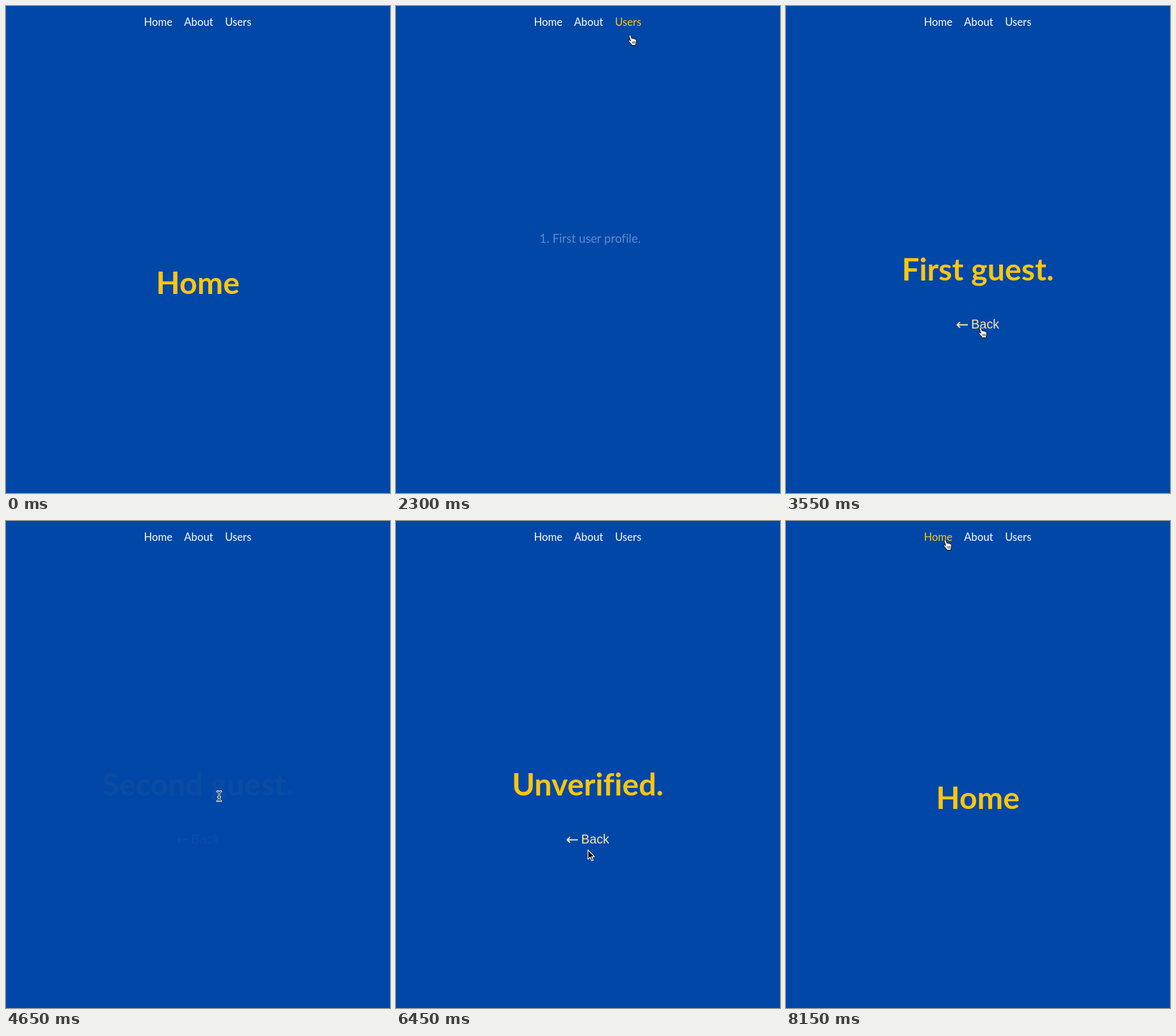
Recreate the animation shown at these times as an HTML page. Size 600 by 761 pixels, loop 8200 ms.

```html
<!DOCTYPE html>
<html lang="en">
<head>
<meta charset="utf-8">
<title>Page transitions</title>
<style>
  html, body { margin: 0; width: 100%; height: 100%; overflow: hidden; background: #0047a8; }
  svg { display: block; width: 600px; height: 761px; }
  text { font-family: Lato, "Open Sans", sans-serif; font-variant-ligatures: none; fill: #fff; text-anchor: middle; }
  .nav { font-size: 16.7px; }
  .title { font-size: 48.3px; font-weight: 700; fill: #fdc60f; }
  .item { font-size: 18.7px; text-anchor: start; }
  .number { font-size: 18.7px; text-anchor: end; }
  .back { font-family: "Liberation Sans", Arial, sans-serif; font-size: 19.7px; fill: #ffe4ac; }
  .pointing { font-family: "DejaVu Sans", sans-serif; font-size: 24px; fill: #ffe4ac; }
  .hot { fill: #fdc60f; }
</style>
</head>
<body>
<svg id="stage" viewBox="0 0 600 761">
  <defs><path id="bar" d="M-3-7.5Q0-7.5 0-5Q0-7.5 3-7.5M0-5V5M-3 7.5Q0 7.5 0 5Q0 7.5 3 7.5M-1.6 1.6H1.6"/></defs>
  <g id="cursor" stroke-linejoin="round" stroke-linecap="round">
    <path id="arrow" fill="#000" stroke="#fff" stroke-width="1.2"
      d="M0 0V14.5L3.4 11.4 5.8 17 8 16 5.7 10.6H10Z"/>
    <g id="hand" fill="#fff" stroke="#000">
      <path d="M-2 1C-2-.8 .6-.8 1 .6L2.6 5C3 4 5 4.2 5.2 5.4 6 4.6 7.4 5 7.6 6.2 8.6 5.6 9.6 6.4 9.6 7.6 9.8 10 9 12 8.6 15.4L2.8 15.6C1.6 12.8-1.4 10.6-2.6 8.6-3 7.2-1.4 6.6-.2 8L.2 8.2Z"/>
      <path fill="none" stroke-width=".7" d="M3.2 9.5L3.8 12.6M5.2 9.4L5.6 12.6M7.2 9.2L7.3 12.4"/>
    </g>
    <g id="beam" fill="none">
      <use href="#bar" stroke="#fff" stroke-width="3"/>
      <use href="#bar" stroke="#000"/>
    </g>
  </g>
</svg>
<script>
const LOOP = 8200, FADE = 200, PAUSE = 20, STAGGER = 115;
const ROW_Y = 364, ROW_GAP = 71.4;
const NS = "http://www.w3.org/2000/svg";
const stage = document.getElementById("stage");
const cursor = document.getElementById("cursor");
const shapes = {};
for (const id of ["arrow", "hand", "beam"]) shapes[id] = document.getElementById(id);

function group(parent) {
  const g = document.createElementNS(NS, "g");
  if (parent) parent.append(g);
  else stage.insertBefore(g, cursor);
  return g;
}

function label(parent, text, x, y, cls) {
  const el = document.createElementNS(NS, "text");
  el.setAttribute("x", x);
  el.setAttribute("y", y);
  el.setAttribute("class", cls);
  el.textContent = text;
  parent.append(el);
  return el;
}

const menu = group();
const nav = [["Home", 237.8], ["About", 301], ["Users", 362.8]].map(([text, x]) =>
  ({ x, el: label(menu, text, x, 31, "nav") }));

function titlePage(text, y = 450) {
  const g = group();
  label(g, text, 299.7, y, "title");
  return { g, titleY: y - 17, parts: [g] };
}

function guestPage(text) {
  const page = titlePage(text, 429);
  label(page.g, "←", 275.5, 505.5, "pointing");
  label(page.g, "Back", 311.2, 504, "back");
  return { ...page, back: true };
}

function listPage(...rows) {
  const g = group();
  const parts = rows.map((text, i) => {
    const row = group(g), y = ROW_Y + 6 + i * ROW_GAP, x = i ? 247.5 : 244.4;
    label(row, i + 1 + ".", x - 4.8, y, "number");
    label(row, text, x, y, "item");
    return row;
  });
  return { g, list: true, parts };
}

const home = titlePage("Home"), about = titlePage("About website");
const users = listPage("First user profile.", "Second user profile.", "Unverified");
const first = guestPage("First guest."), second = guestPage("Second guest.");
const third = guestPage("Unverified.");
const pages = [home, about, users, first, second, third];

// Stops of the pointer; a stop with a page is a click that opens it.
const stops = [
  { t: 50, x: 450, y: 511 },
  { t: 800, x: 302, y: 30, open: about },
  { t: 2008, x: 366, y: 46, open: users },
  { t: 2850, x: 300, y: 367, open: first },
  { t: 3600, x: 304, y: 503, open: users },
  { t: 4423, x: 333, y: 430, open: second },
  { t: 5145, x: 318, y: 513, open: users },
  { t: 5900, x: 316, y: 531, open: third },
  { t: 6450, x: 300, y: 514 },
  { t: 6550, x: 362, y: 28, open: users },
  { t: 6720, x: 535, y: 4 },
  { t: 7100, x: 302, y: 28, open: about },
  { t: 7480, x: 249, y: 30, open: home }
];
const clicks = stops.filter(s => s.open);

const clamp = v => Math.max(0, Math.min(1, v));
const smooth = k => k * k * (3 - 2 * k);

// Rest at each stop for a third of the way, then glide to the next.
function pointer(t) {
  const i = Math.max(0, stops.findLastIndex(s => s.t <= t));
  const a = stops[i], b = stops[i + 1] || a;
  const k = b === a ? 0 : (t - a.t) / (b.t - a.t);
  const e = smooth(clamp((k - 0.35) / 0.55));
  return [a.x + (b.x - a.x) * e, a.y + (b.y - a.y) * e];
}

// The page on show, with the times it enters and leaves.
function visit(t) {
  const i = clicks.findLastIndex(c => c.t + FADE <= t);
  return {
    page: i < 0 ? home : clicks[i].open,
    enter: i < 0 ? -LOOP : clicks[i].t + FADE + PAUSE,
    leave: i + 1 < clicks.length ? clicks[i + 1].t : 2 * LOOP
  };
}

function draw(t) {
  const [x, y] = pointer(t), shown = t >= stops[0].t;
  const near = (cx, cy, w, h) => shown && Math.abs(x - cx) < w && Math.abs(y - cy) < h;
  const { page, enter, leave } = visit(t);
  let kind = "arrow";

  if (page.titleY && t >= enter && near(300, page.titleY, 120, 28)) kind = "beam";
  if (page.back && near(300, 497, 45, 17)) kind = "hand";

  for (const link of nav) {
    const hot = near(link.x, 28, 26, 20);
    link.el.classList.toggle("hot", hot);
    if (hot) kind = "hand";
  }

  for (const p of pages) p.g.style.display = p === page ? "" : "none";
  page.parts.forEach((part, i) => {
    const shownBy = clamp((t - enter - i * STAGGER) / FADE);
    part.setAttribute("opacity", shownBy * (1 - clamp((t - leave) / FADE)));
    if (!page.list) return;
    const hot = near(312, ROW_Y + i * ROW_GAP, 108, 28);
    for (const el of part.children) el.classList.toggle("hot", hot);
    if (hot) kind = "hand";
  });

  cursor.style.display = shown ? "" : "none";
  cursor.setAttribute("transform", `translate(${x.toFixed(2)} ${y.toFixed(2)})`);
  for (const id in shapes) shapes[id].style.display = id === kind ? "" : "none";
}

const start = performance.now();
function tick(now) {
  draw(Math.max(0, now - start) % LOOP);
  requestAnimationFrame(tick);
}
draw(0);
requestAnimationFrame(tick);
</script>
</body>
</html>
```
